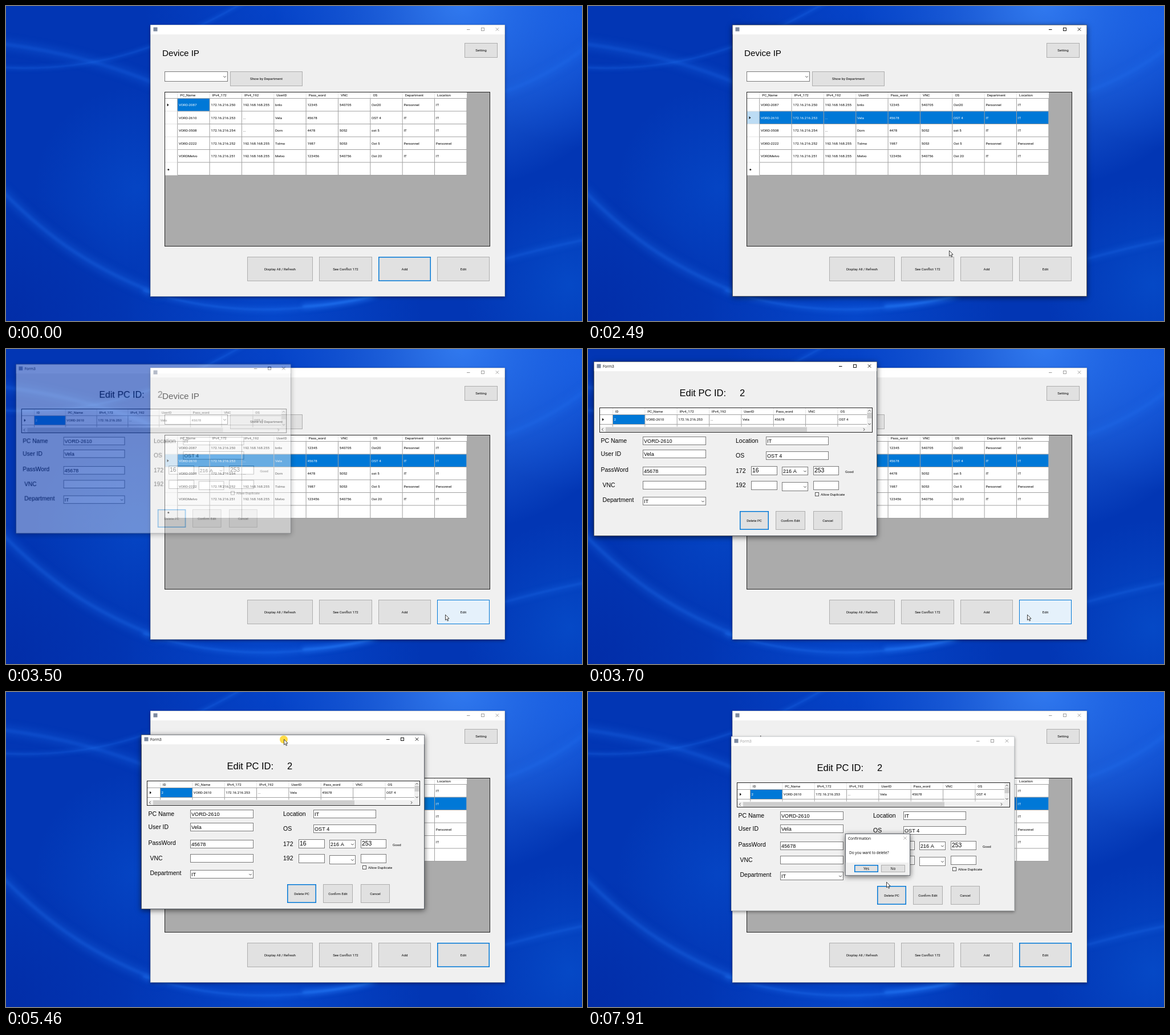
Write an HTML page with a canvas that moves like this. It is 1010 px wide and 554 px high and loops after 8 s.

```html
<!DOCTYPE html>
<html lang="en">
<head>
<meta charset="utf-8">
<title>Device IP</title>
<style>
html, body { margin: 0; width: 1010px; height: 554px; overflow: hidden; background: #0236b4; }
canvas { display: block; }
</style>
</head>
<body>
<canvas id="stage" width="1010" height="554"></canvas>
<script>
const W = 1010, H = 554, LOOP = 8000;
const BLUE = '#0078d7', GREY = '#f0f0f0', LINE = '#a0a0a0', PALE = '#e3e3e3';
const GRID_FONT = '6.15px Roboto, sans-serif';
const UI_FONT = '6.5px "Open Sans", sans-serif';
const arial = (size, weight = 400) => `${weight} ${size}px "Liberation Sans", Arial, sans-serif`;

const newContext = () => {
  const c = document.createElement('canvas');
  c.width = W;
  c.height = H;
  return c.getContext('2d');
};
const stage = document.getElementById('stage').getContext('2d');
const layer = newContext();
let g = stage;
let mouse = [0, 0];
let mouseLive = true;

// Bursts of change: start, end, number of steps, pointer path
const bursts = {
  enter:  [100, 840, 8, [[1010, 620], [846, 470], [600, 330], [255, 230], [277, 204]]],
  hover:  [940, 1060, 2, [[277, 204], [281, 198]]],
  select: [1280, 1380, 2],
  leave:  [1830, 2610, 8, [[281, 198], [350, 245], [480, 350], [598, 421], [668, 439]]],
  toEdit: [2710, 3150, 5, [[668, 439], [730, 463], [770, 467]]],
  open:   [3380, 3700, 4],
  toBar:  [3910, 4680, 8, [[770, 467], [620, 260], [350, 70], [238, 16], [260, 30]]],
  drag:   [4780, 5560, 8],
  toDel:  [5790, 6570, 8, [[501, 86], [515, 120], [545, 210], [564, 310], [532, 339]]],
  wander: [6670, 7130, 5, [[532, 339], [560, 290], [535, 355]]],
  ask:    [7350, 7910, 6, [[535, 355], [535, 355], [523, 334]]]
};
const DRAG = [0, .01, .04, .08, .141, .4, .72, .94, 1];
const FADE = [0, 0, .43, .9, 1];

function stepAt(t, [start, end, n]) {
  if (t < start) return 0;
  return Math.min(n, 1 + Math.floor((t - start) / (end - start) * (n - 1) + .1));
}

function along(points, u) {
  const f = u * (points.length - 1);
  const i = Math.min(Math.floor(f), points.length - 2);
  return points[i].map((v, j) => v + (points[i + 1][j] - v) * (f - i));
}

// Drawing helpers
function fill(x, y, w, h, color) {
  g.fillStyle = color;
  g.fillRect(x, y, w, h);
}

function box(x, y, w, h, color, border, lw = 1) {
  fill(x, y, w, h, color);
  g.strokeStyle = border;
  g.lineWidth = lw;
  g.strokeRect(x + lw / 2, y + lw / 2, w - lw, h - lw);
}

function text(s, x, y, font = GRID_FONT, color = '#000', align = 'left') {
  g.font = font;
  g.fillStyle = color;
  g.textAlign = align;
  g.fillText(s, x, y);
}

function stroke(points, color, lw = 1) {
  g.strokeStyle = color;
  g.lineWidth = lw;
  g.beginPath();
  points.forEach(([x, y]) => g.lineTo(x, y));
  g.stroke();
}

function shape(points, color) {
  g.fillStyle = color;
  g.beginPath();
  points.forEach(([x, y]) => g.lineTo(x, y));
  g.fill();
}

function chevron(x, y, dx, dy, color = '#444') {
  // Points towards (dx, dy)
  const a = 2.2, b = 1.1;
  stroke([[x - dx * b - dy * a, y - dy * b - dx * a], [x + dx * b, y + dy * b],
          [x - dx * b + dy * a, y - dy * b + dx * a]], color);
}

const marker = (x, y) => shape([[x, y - 2.5], [x + 3, y], [x, y + 2.5]], '#111');

function button(x, y, w, h, label, focus, pressed) {
  const [mx, my] = mouse;
  const over = mouseLive && mx >= x && mx < x + w && my >= y && my < y + h;
  if (over && pressed) box(x, y, w, h, '#cce4f7', '#005499');
  else if (over) box(x, y, w, h, '#e5f1fb', BLUE);
  else if (focus) box(x, y, w, h, '#e1e1e1', BLUE, 1.5);
  else box(x, y, w, h, '#e1e1e1', '#adadad');
  text(label, x + w / 2, y + h / 2 + 2.3, GRID_FONT, '#000', 'center');
}

function field(x, y, w, h, value = '', font = arial(9.1), combo = false) {
  box(x, y, w, h, '#fff', '#7a7a7a');
  text(value, x + 2, y + h / 2 + 3.4, font);
  if (combo) chevron(x + w - 5.5, y + h / 2 + .5, 0, 1);
}

function cross(x, y, color) {
  stroke([[x - 2.7, y - 2.7], [x + 2.7, y + 2.7]], color, .9);
  stroke([[x - 2.7, y + 2.7], [x + 2.7, y - 2.7]], color, .9);
}

function frame(x, y, w, h, title, active) {
  g.save();
  g.shadowColor = active ? 'rgba(0,0,0,.6)' : 'rgba(0,0,0,.4)';
  g.shadowBlur = active ? 9 : 5;
  g.shadowOffsetY = 2;
  fill(x, y, w, h, GREY);
  g.restore();
  box(x, y, w, h, GREY, active ? '#4a4f58' : '#a9adb3', active ? .9 : .6);
  fill(x + .8, y + .8, w - 1.6, 16.2, '#fff');
  fill(x + 5.5, y + 4.5, 7, 7, '#7d8aa0');
  const ink = active ? '#000' : '#999';
  text(title, x + 16, y + 10.7, UI_FONT, ink);
  const r = x + w, m = y + 8;
  stroke([[r - 67, m + .5], [r - 61.5, m + .5]], ink);
  g.lineWidth = .9;
  g.strokeRect(r - 41.5, m - 2.5, 5, 5);
  cross(r - 13.5, m, ink);
}

// Wallpaper, painted once
function paintWallpaper() {
  const c = newContext();
  c.fillStyle = '#0236b4';
  c.fillRect(0, 0, W, H);
  const glow = (x, y, r, rgb, a) => {
    const grad = c.createRadialGradient(x, y, 0, x, y, r);
    grad.addColorStop(0, `rgba(${rgb},${a})`);
    grad.addColorStop(1, `rgba(${rgb},0)`);
    c.fillStyle = grad;
    c.fillRect(0, 0, W, H);
  };
  glow(800, -10, 330, '62,140,255', .8);
  glow(1010, 20, 230, '30,110,250', .5);
  glow(480, -20, 240, '10,90,235', .4);
  glow(230, 320, 180, '10,95,225', .35);
  glow(990, 490, 190, '10,100,225', .4);
  glow(470, 550, 260, '10,95,235', .4);
  glow(0, 554, 230, '0,18,130', .25);
  const streak = (d, width, a) => {
    const path = new Path2D(d);
    for (const [w, k] of [[width, .35], [width / 3, .3]]) {
      c.filter = `blur(${w / 2}px)`;
      c.lineWidth = w;
      c.strokeStyle = `rgba(40,125,250,${a * k})`;
      c.stroke(path);
    }
    c.filter = 'none';
  };
  streak('M-10 66 C100 80 190 105 270 140', 14, .7);
  streak('M-10 108 C140 116 260 85 420 -8', 6, .7);
  streak('M-10 322 C80 415 160 465 270 508', 14, .8);
  streak('M240 500 Q430 562 640 510', 8, .9);
  streak('M520 528 Q600 524 650 508', 9, 1.2);
  streak('M870 152 Q950 125 1020 70', 14, .6);
  streak('M870 446 Q950 424 1020 410', 10, .6);
  return c.canvas;
}
const wallpaper = paintWallpaper();

const HEADS = ['PC_Name', 'IPv4_172', 'IPv4_192', 'UserID', 'Pass_word', 'VNC', 'OS', 'Department', 'Location'];
const ROWS = [
  ['VORD-2087', '172.16.216.250', '192.168.168.255', 'brilo', '12345', '540705', 'Ost20', 'Personnel', 'IT'],
  ['VORD-2610', '172.16.216.253', '...', 'Vela', '45678', '', 'OST 4', 'IT', 'IT'],
  ['VORD-3508', '172.16.216.254', '...', 'Dorn', '4478', '5052', 'ost 5', 'IT', 'IT'],
  ['VORD-2222', '172.16.216.252', '192.168.168.255', 'Tolmo', '1987', '5053', 'Ost 5', 'Personnel', 'Personnel'],
  ['VORDMelvo', '172.16.216.251', '192.168.168.255', 'Melvo', '123456', '540756', 'Ost 20', 'IT', 'IT'],
  []
];
const COL = 56.35, ROW = 22.5;

function mainWindow(s) {
  const selected = s.select > 0;
  frame(253, 33, 622, 478, '', selected && s.open < 2);
  text('Device IP', 274, 88, arial(15.2));
  button(804, 65, 58, 26, 'Setting');
  field(278, 115, 111, 18, '', arial(9), true);
  button(393, 115, 127, 26, 'Show by Department');

  const left = 300.7;
  box(278, 151, 571, 272, '#ababab', '#222');
  fill(279, 152, 529, 146, '#fff');
  const headerHover = s.hover > 0 && s.leave < 1;
  ROWS.forEach((cells, r) => {
    const y = 162.5 + r * ROW, mid = y + ROW / 2;
    const on = selected && r === 1;
    if (on) {
      fill(279, y, 22, ROW, headerHover ? '#9fcdf0' : '#bcdcf4');
      fill(left, y, 507, ROW, BLUE);
    } else if (r === 1 && headerHover) fill(279, y, 22, ROW, '#d9ebf9');
    if (!selected && r === 0) fill(left, y, COL, ROW, BLUE);
    cells.forEach((v, i) => {
      const white = on || (!selected && r === 0 && i === 0);
      text(v, left + 2.3 + i * COL, mid + 2.4, GRID_FONT, white ? '#fff' : '#000');
    });
  });
  HEADS.forEach((v, i) => {
    const x = left + i * COL;
    text(v, x + 4.6, 159.3);
    stroke([[x, 152], [x, 162]], PALE);
    stroke([[x + COL, 162], [x + COL, 297.5]], LINE);
  });
  stroke([[left, 162], [left, 297.5]], LINE);
  for (let i = 0; i <= 6; i++) {
    const y = 162.5 + i * ROW;
    stroke([[279, y], [left, y]], i ? PALE : LINE);
    stroke([[left, y], [808, y]], LINE);
  }
  marker(282.5, 174 + (selected ? ROW : 0));
  text('*', 283, 292, arial(9, 700));

  button(423, 441, 115, 43, 'Display All / Refresh');
  button(549, 441, 93, 43, 'See Conflict 172');
  button(653, 441, 92, 43, 'Add', !selected);
  button(756, 441, 92, 43, 'Edit', s.open > 0, s.open === 1);
}

function formGrid() {
  box(10, 81, 479, 44, '#fff', '#222');
  const right = 479, x0 = 33.5;
  fill(x0, 93.5, COL, 17, BLUE);
  stroke([[11, 93.5], [right, 93.5]], LINE);
  stroke([[11, 110.5], [right, 110.5]], LINE);
  stroke([[x0, 93], [x0, 114.5]], LINE);
  ['ID', ...HEADS.slice(0, 7)].forEach((v, i) => {
    const x = x0 + i * COL;
    text(v, x + 4.3, 89.6);
    text(['2', ...ROWS[1]][i], x + 2, 104.4, GRID_FONT, i ? '#000' : '#fff');
    stroke([[x, 82], [x, 93]], PALE);
    if (i < 7) stroke([[x + COL, 93], [x + COL, 114.5]], LINE);
  });
  marker(15, 102);
  fill(11, 115, 477, 9, GREY);
  fill(21, 115.5, 353, 8, '#cdcdcd');
  fill(right, 82, 9, 33, GREY);
  fill(right + .5, 90, 8, 10, '#cdcdcd');
  chevron(15.5, 119.5, -1, 0);
  chevron(474, 119.5, 1, 0);
  chevron(483.5, 86.5, 0, -1);
  chevron(483.5, 110, 0, 1);
}

function editForm(s) {
  frame(0, 0, 497, 307, 'Form3', s.ask < 2);
  text('Edit PC ID:', 150.5, 61, arial(16.5));
  text('2', 256, 61, arial(16.5));
  formGrid();

  const [name, , , user, pass, , os, dept, place] = ROWS[1];
  const label = (v, x, y) => text(v, x, y, arial(10.5));
  label('PC Name', 12.5, 143.4);
  label('User ID', 12.5, 165.8);
  label('PassWord', 12.5, 193.5);
  label('VNC', 15.5, 220.5);
  label('Department', 15.5, 247.3);
  label('Location', 249, 143.4);
  label('OS', 249, 169);
  label('172', 249, 196);
  label('192', 249, 220.8);
  field(86, 132, 111, 15, name);
  field(86, 155, 111, 15, user);
  field(86, 185, 111, 15, pass);
  field(86, 210, 111, 15);
  field(86, 238, 111, 15, dept, arial(9.1), true);
  field(302, 132, 110, 15, place);
  field(302, 158, 110, 15, os);
  field(276, 184, 46, 16, '16', arial(10.4));
  field(330, 185, 46, 15, '216 A', arial(9.1), true);
  field(385, 184, 45, 16, '253', arial(10.4));
  field(276, 210, 46, 16);
  field(330, 212, 46, 16, '', arial(9.1), true);
  field(385, 210, 45, 16);
  text('Good', 441, 195.7);
  box(388, 230, 7, 7, '#fff', '#444', .9);
  text('Allow Duplicate', 398, 236);
  button(256, 263, 51, 33, 'Delete PC', true, s.ask === 1);
  button(319, 263, 52, 33, 'Confirm Edit');
  button(385, 263, 51, 33, 'Cancel');
}

function confirmBox() {
  g.save();
  g.shadowColor = 'rgba(0,0,0,.6)';
  g.shadowBlur = 9;
  g.shadowOffsetY = 2;
  fill(0, 0, 114, 74, '#fff');
  g.restore();
  box(0, 0, 114, 74, '#fff', '#4a4f58', .9);
  fill(.8, 51, 112.4, 22.2, GREY);
  text('Confirmation', 5, 10.7, UI_FONT);
  cross(105, 8, '#aaa');
  text('Do you want to delete?', 7, 36, UI_FONT);
  box(16, 55, 42, 13, '#e1e1e1', BLUE, 1.5);
  box(63, 55, 42, 13, '#e1e1e1', '#adadad');
  text('Yes', 37, 64, UI_FONT, '#000', 'center');
  text('No', 84, 64, UI_FONT, '#000', 'center');
}

// Paints a window on its own layer, then fades and scales it in
function popup(x, y, w, h, alpha, paint) {
  if (!alpha) return;
  g = layer;
  g.clearRect(0, 0, W, H);
  g.save();
  g.translate(x, y);
  const pointer = mouse;
  mouse = [mouse[0] - x, mouse[1] - y];
  paint();
  mouse = pointer;
  g.restore();
  g = stage;
  const scale = .95 + .05 * alpha, cx = x + w / 2, cy = y + h / 2;
  g.save();
  g.globalAlpha = alpha;
  g.translate(cx, cy);
  g.scale(scale, scale);
  g.drawImage(layer.canvas, -cx, -cy);
  g.restore();
}

function pointer([x, y], pressed) {
  if (pressed) {
    g.fillStyle = 'rgba(255,214,50,.9)';
    g.beginPath();
    g.arc(x, y + .5, 7, 0, 7);
    g.fill();
  }
  const arrow = [[0, 0], [0, 9.6], [2.2, 7.6], [3.7, 11], [5.2, 10.3], [3.7, 7], [6.6, 6.8], [0, 0]]
    .map(([dx, dy]) => [x + .5 + dx, y + .3 + dy]);
  shape(arrow, '#fff');
  stroke(arrow, '#111', .8);
}

function draw(t) {
  const s = {};
  let at = null;
  const p = DRAG[stepAt(t, bursts.drag)];
  const fx = Math.round(10 + 241 * p), fy = Math.round(22 + 56 * p);
  for (const name in bursts) {
    const burst = bursts[name];
    const k = s[name] = stepAt(t, burst);
    if (k && burst[3]) at = along(burst[3], k / burst[2]);
    if (k && name === 'drag') at = [fx + 250, fy + 8];
  }
  mouse = at || [-99, -99];
  mouseLive = s.ask < 2;

  g.drawImage(wallpaper, 0, 0);
  mainWindow(s);
  popup(fx, fy, 497, 307, FADE[s.open], () => editForm(s));
  popup(451, 249, 114, 74, FADE[Math.min(4, s.ask && s.ask + (s.ask > 2))], confirmBox);
  const pressed = s.select === 1 || s.open === 1 || s.ask === 1 || (s.drag > 0 && !s.toDel);
  if (at) pointer(at, pressed);
}

function tick() {
  draw(performance.now() % LOOP);
  requestAnimationFrame(tick);
}
tick();
</script>
</body>
</html>
```
